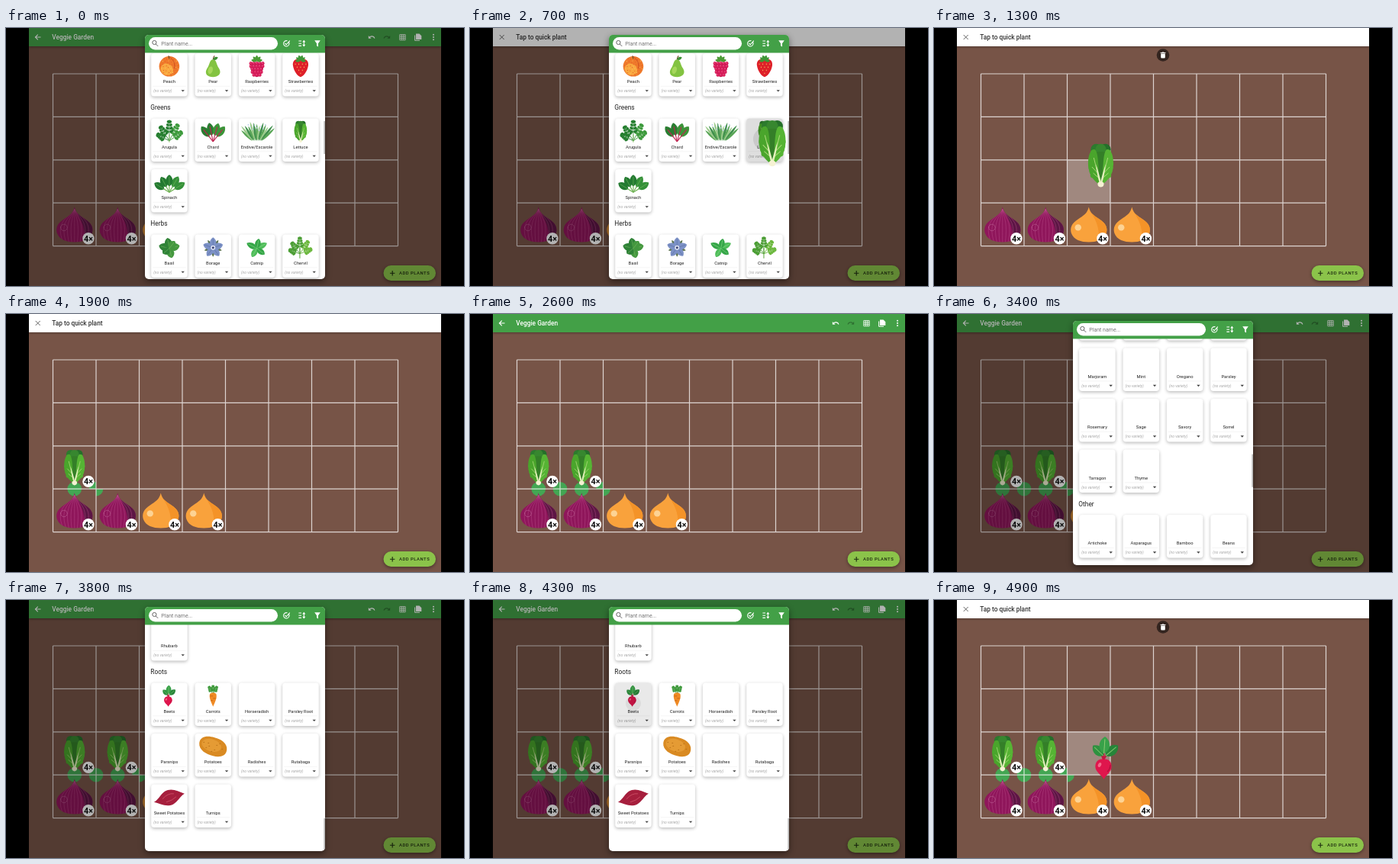
These frames come from a looping animation (600 by 338 pixels, 5 s). An HTML page with a canvas:

```html
<!DOCTYPE html>
<html lang="en">
<head>
<meta charset="utf-8">
<title>Garden planner</title>
<style>
html, body { margin: 0; width: 100%; height: 100%; overflow: hidden; background: #000; }
canvas { display: block; width: 600px; height: 338px; }
</style>
</head>
<body>
<canvas id="stage"></canvas>
<script>
const canvas = document.getElementById('stage');
const c = canvas.getContext('2d');
const dpr = window.devicePixelRatio || 1;
canvas.width = 600 * dpr;
canvas.height = 338 * dpr;

const LOOP = 5000, STEP = 100;
const GX = 61.5, GY = 60, CW = 56.5, CH = 56.4;
const FONT = 'Roboto, Arial, sans-serif';

// ---------- helpers ----------
const clamp = v => Math.max(0, Math.min(1, v));
const ramp = (t, a, b) => clamp((t - a) / (b - a));
const ease = v => v * v * (3 - 2 * v);
const lerp = (a, b, v) => a + (b - a) * v;

function fill(d, color) {
  c.fillStyle = color;
  c.fill(new Path2D(d));
}
function line(d, color, w = 1) {
  c.strokeStyle = color;
  c.lineWidth = w;
  c.stroke(new Path2D(d));
}
function oval(x, y, rx, ry, color, rot = 0) {
  c.beginPath();
  c.ellipse(x, y, rx, ry, rot, 0, 7);
  c.fillStyle = color;
  c.fill();
}
const dot = (x, y, r, color) => oval(x, y, r, r, color);
function box(x, y, w, h, r, color) {
  c.beginPath();
  c.roundRect(x, y, w, h, r);
  c.fillStyle = color;
  c.fill();
}
function at(x, y, k, draw, deg = 0) {
  c.save();
  c.translate(x, y);
  c.rotate(deg * Math.PI / 180);
  c.scale(k, k);
  draw();
  c.restore();
}
function text(str, x, y, font, color, align = 'left', gap = 0) {
  c.font = font + ' ' + FONT;
  c.fillStyle = color;
  c.textAlign = align;
  c.textBaseline = 'alphabetic';
  c.letterSpacing = gap + 'px';
  c.fillText(str, x, y);
}
function shadow(color, blur, dy) {
  c.shadowColor = color;
  c.shadowBlur = blur * dpr;
  c.shadowOffsetY = dy * dpr;
}
const noShadow = () => shadow('transparent', 0, 0);

// A pointed leaf growing upwards from (x, y), turned by deg.
function leaf(x, y, deg, len, w, color, rib) {
  at(x, y, 1, () => {
    fill(`M0 0C${w} ${-len * .2} ${w} ${-len * .75} 0 ${-len}C${-w} ${-len * .75} ${-w} ${-len * .2} 0 0`, color);
    if (rib) line(`M0 0V${-len * .85}`, rib, .5);
  }, deg);
}
function frond(x, y, deg, len, r, color) {
  at(x, y, 1, () => {
    line(`M0 0V${-len}`, color, .8);
    for (let i = 3; i <= 6; i++) {
      const v = -len * i / 6, w = r * (1.25 - i / 8);
      oval(-w, v, w, r * .55, color, .5);
      oval(w, v, w, r * .55, color, -.5);
    }
    dot(0, -len, r * .7, color);
  }, deg);
}

// ---------- plants, about 28 units tall ----------
const plants = {
  Peach() {
    dot(0, 0, 13.3, '#ef7a2b');
    oval(-3, 4, 8.5, 7.5, '#f9a83f', .4);
    for (let i = 0; i < 46; i++) {
      const a = i * 2.4, r = 1.9 * Math.sqrt(i);
      dot(Math.cos(a) * r, Math.sin(a) * r, .55, i % 3 ? '#e2562b' : '#fbc768');
    }
    line('M0 -13C5 -9 8 -4 7 3', '#c9471f', .9);
    line('M0 -10L-1 -14', '#6b4a25', 1.2);
  },
  Pear() {
    fill('M0 -9C5 -9 4 -2 8 3C12 10 6 14 0 14C-7 14 -12 10 -8 3C-4 -2 -5 -9 0 -9', '#83c341');
    oval(-3.5, 5, 3, 5, '#a6d75b', .3);
    line('M0 -9C0 -11 1 -13 2 -14', '#6a4a24', 1.2);
    leaf(0, -9, 65, 7, 2.6, '#3d8f35');
  },
  Raspberries() {
    fill('M-9 -5C-10 4 -4 14 0 14C4 14 10 4 9 -5Z', '#b5124c');
    for (let j = 0; j < 5; j++)
      for (let i = 0, n = 5 - (j >> 1); i < n; i++) {
        const x = (i - (n - 1) / 2) * 3.9, y = -4 + j * 3.8;
        dot(x, y, 2.2, '#d81e5b');
        dot(x - .6, y - .6, .7, '#f06a95');
      }
    for (let a = -80; a <= 80; a += 40) leaf(0, -7, a, 7.5, 2.4, '#4b9b35');
  },
  Strawberries() {
    fill('M0 -8C6 -12 11 -7 10 -1C9 6 4 13 0 14C-4 13 -9 6 -10 -1C-11 -7 -6 -12 0 -8', '#de2029');
    for (let j = 0; j < 4; j++)
      for (let i = 0; i < 4 - j; i++) oval((i - (3 - j) / 2) * 4.6, -3 + j * 4, .5, .9, '#f9cf62');
    for (let a = -100; a <= 100; a += 40) leaf(0, -8, a, 7, 2.3, '#3f9636');
  },
  Arugula() {
    [-62, 55, -32, 28, 0].forEach((a, i) =>
      frond(0, 12, a, 17 + i * 2, 3.2, i % 2 ? '#3d9a3c' : '#267f30'));
    line('M0 14V4', '#8cc46a', 1);
  },
  Chard() {
    [-38, 38, -12, 16].forEach((a, i) => {
      at(0, 13, 1, () => {
        leaf(0, -8, 0, 17, 6, i % 2 ? '#3c9439' : '#2a7d31');
        line('M0 0V-20', '#bf2450', 1.1);
      }, a);
    });
  },
  'Endive/Escarole'() {
    for (let i = 0; i < 13; i++) {
      const a = (i - 6) * 11;
      leaf(i - 6, 12, a * .7, 20 + i * 5 % 7, 1.9, ['#5aa657', '#9ccb8b', '#3f8f4c'][i % 3]);
    }
    for (let i = 0; i < 9; i++) dot((i - 4) * 2.8, -9 + i * 3 % 8, .9, '#b9cdea');
  },
  Lettuce() {
    [[-3, '#2c7b2e'], [3, '#256f2a'], [0, '#37872f']].forEach(([x, k]) => oval(x, -10.5, 3.6, 3.6, k));
    fill('M0 13C-10 6 -9 -10 0 -9C9 -10 10 6 0 13', '#347f28');
    for (const m of [-1, 1]) {
      c.save();
      c.scale(m, 1);
      const green = m < 0 ? '#4aa52c' : '#56b434';
      fill('M.5 13C3 11 7 8 8 2C9 -5 7 -11 4 -10.5C1 -8 2 2 .5 13', green);
      for (let i = 0; i < 7; i++) dot(6.6 - Math.abs(i - 3.2) * .55, -8.5 + i * 2.5, 1.8, green);
      line('M.5 12C2 6 3 1 4.6 -5M2 5L5.8 1M1.6 8L5 5', '#a9d877', .5);
      fill('M0 13C2 9 2.6 4 3.2 -1C1.8 3 .8 7 0 10Z', '#e4f0be');
      c.restore();
    }
    fill('M-2 11.5Q0 9.5 2 11.5Q2.4 14 0 14.3Q-2.4 14 -2 11.5', '#f5f2d3');
  },
  Spinach() {
    [-58, 58, -28, 30, 0].forEach((a, i) => at(0, 13, 1, () => {
      line('M0 0V-12', '#6bb04f', 1.1);
      leaf(0, -8, 0, 15 + i % 2, 6, i % 2 ? '#359139' : '#237a31', '#79bd62');
    }, a));
  },
  Basil() {
    [[-75, 14], [75, 14], [-10, 14], [165, 13], [-130, 11], [38, 12]].forEach(([a, l], i) =>
      leaf(0, 1, a, l, 6.5, i % 2 ? '#44983f' : '#2f8237', '#7dbb68'));
  },
  Borage() {
    for (let a = 36; a < 396; a += 72) leaf(0, 0, a, 12, 2.4, '#5f7653');
    for (let a = 0; a < 360; a += 72) leaf(0, 0, a, 13.5, 5.6, '#7c91c6', '#52689f');
    dot(0, 0, 3, '#dfe5f4');
    dot(0, 0, 1.5, '#3a4272');
  },
  Catnip() {
    [-62, 62, 12, -150, 128].forEach((a, i) =>
      leaf(0, 1, a, i < 2 ? 15 : 13, 5, i % 2 ? '#4fbd5a' : '#35a648', '#8fdd8e'));
  },
  Chervil() {
    [-70, 68, -36, 34, 0].forEach((a, i) => frond(-1, 8, a, 14 + i * 1.6, 2.9, i % 2 ? '#6cb83e' : '#4c9e35'));
    line('M-1 14V0', '#5ba53a', 1);
  },
  Beets() {
    line('M-1.5 2L-1 -8M-1.5 2Q-2 -2 -5 -5M-1.5 2Q0 -3 4 -5', '#c2183f', 1);
    leaf(-1.6, -1.5, -46, 9.5, 4, '#2f9140', '#7fc06c');
    leaf(0, -1.5, 50, 10.5, 4.2, '#268539', '#7fc06c');
    leaf(-1.2, -3, 4, 11, 4.5, '#38a149', '#8acb73');
    fill('M-1.5 1C2 0 4 3 3.8 6C3.5 9.5 0 11 -1.2 14C-2.6 11 -6.5 9.5 -6.8 6C-7 3 -5 0 -1.5 1', '#df164d');
    oval(-4, 4.5, 1, 1.5, '#f36a8b', .5);
    line('M1 9Q3 7 3 4.5', '#b00f3c', .6);
  },
  Carrots() {
    [-28, 26, 0].forEach(a => frond(0, -2, a, 11, 2, '#3f9a3c'));
    fill('M-4 -3Q0 -6 4 -3C6 2 2 9 0 14C-2 9 -6 2 -4 -3', '#f08a24');
    line('M-4 0H0M4 3H0M-3 6H0', '#b95c12', .7);
  },
  Potatoes() {
    fill('M-18 -5C-17 -14 -7 -15 2 -12C11 -10 19 -4 18 4C17 13 8 14 0 12C-9 10 -19 4 -18 -5', '#d98a22');
    oval(-2, -2, 13, 8, '#e59b34', .3);
    for (let i = 0; i < 9; i++) oval(i * 7 % 25 - 12, i * 5 % 13 - 6, 1, .5, '#b56d15');
  },
  'Sweet Potatoes'() {
    fill('M-20 6C-14 3 -12 -4 -6 -8C2 -13 11 -9 20 -5C14 -2 12 5 5 9C-4 13 -12 8 -20 6', '#a61f3d');
    line('M-9 2Q-2 -6 6 -5M-4 6Q4 4 9 -1', '#c94a62', 1);
  }
};

const BULB = new Path2D('M0-23C2-14 7-12 14-7C22-2 25 4 23 11C20 20 10 23 0 23C-10 23-20 20-23 11C-25 4-22-2-14-7C-7-12-2-14 0-23Z');
function onion(base, shade, ribs) {
  c.save();
  c.clip(BULB);
  c.fillStyle = base;
  c.fillRect(-25, -24, 50, 48);
  fill('M0 -24C4 -10 17 0 12 24H26V-24Z', shade);
  if (ribs) {
    for (let i = -4; i <= 4; i++) line(`M0 -20C${i} -10 ${i * 7} -6 ${i * 3.6} 24`, ribs, .45);
    c.setLineDash([1, 1]);
    line('M-18 4a4.2 4.2 0 1 0 8.4 0a4.2 4.2 0 1 0 -8.4 0', '#d287b0', .8);
    c.setLineDash([]);
  } else {
    dot(-14, 4, 4.2, '#fdd394');
  }
  c.restore();
}
const redOnion = () => onion('#8f165b', '#5c1644', '#b9508c');
const yellowOnion = () => onion('#f9a23c', '#f49328');

// ---------- garden ----------
function badge(col, row) {
  const x = GX + col * CW + 46.4, y = GY + row * CH + 46.6;
  dot(x, y, 7.7, '#fff');
  text('4×', x, y + 3.8, 'bold 10.8px', '#111', 'center');
}
function planted(col, row, k, draw) {
  at(GX + (col + .5) * CW, GY + (row + .5) * CH, k, draw);
  badge(col, row);
}
function quarter(x, y, q) {
  c.beginPath();
  c.moveTo(x, y);
  c.arc(x, y, 9.3, q * Math.PI / 2, (q + 1) * Math.PI / 2);
  c.fillStyle = '#43a653';
  c.fill();
}
function companions(col) {
  const x = GX + col * CW, y = GY + 3 * CH;
  dot(x + CW / 2, y, 9.3, '#43a653');
  for (const q of [0, 2]) quarter(x + CW, y, q);
  if (col) for (const q of [1, 3]) quarter(x, y, q);
}
function garden(lettuces, hover) {
  c.fillStyle = '#775447';
  c.fillRect(30, 0, 540, 338);
  if (hover) {
    c.fillStyle = 'rgba(255,255,255,.3)';
    c.fillRect(GX + hover[0] * CW, GY + hover[1] * CH, CW, CH);
  }
  for (let i = 0; i < lettuces; i++) companions(i);
  let d = '';
  for (let i = 0; i <= 8; i++) d += `M${GX + i * CW} ${GY}v${4 * CH}`;
  for (let j = 0; j <= 4; j++) d += `M${GX} ${GY + j * CH}h${8 * CW}`;
  line(d, 'rgba(255,255,255,.75)', 1.2);
  for (let i = 0; i < 4; i++) planted(i, 3, 1, i < 2 ? redOnion : yellowOnion);
  for (let i = 0; i < lettuces; i++) planted(i, 2, 1.64, plants.Lettuce);
}

const UNDO = 'M12.5 8c-2.65 0-5.05.99-6.9 2.6L2 7v9h9l-3.62-3.62c1.39-1.16 3.16-1.88 5.12-1.88 3.54 0 6.55 2.31 7.6 5.5l2.37-.78C21.08 11.03 17.15 8 12.5 8z';
function appBar(quick) {
  shadow('rgba(0,0,0,.35)', 3, 1);
  c.fillStyle = quick ? '#fff' : '#43a047';
  c.fillRect(30, 0, 540, 24);
  noShadow();
  if (quick) {
    line('M38.7 9L44.7 15M44.7 9L38.7 15', '#666', 1);
    text('Tap to quick plant', 60.3, 15, '500 8.35px', '#333');
    return;
  }
  line('M45.5 12H38.5M41.8 8.6L38.4 12L41.8 15.4', '#fff', 1.1);
  text('Veggie Garden', 60.3, 15, '500 8.35px', '#fff');
  at(474, 7, .42, () => fill(UNDO, '#fff'));
  c.save();
  c.translate(504, 7);
  c.scale(-.42, .42);
  fill(UNDO, 'rgba(0,0,0,.3)');
  c.restore();
  line('M515.8 8.6h7.4v7.2h-7.4zM518.3 8.6v7.2M520.8 8.6v7.2M515.8 11h7.4M515.8 13.4h7.4', '#fff', .8);
  line('M535.6 9.5V16.3H542', '#fff', 1);
  fill('M537 7.5H541.5L544.3 10.3V15H537Z', '#fff');
  for (const y of [8.8, 12, 15.2]) dot(560, y, 1, '#fff');
}
function addButton() {
  shadow('rgba(0,0,0,.4)', 4, 1.5);
  box(494.5, 311, 68.5, 20, 10, '#8bc34a');
  noShadow();
  line('M503 321.2H509.4M506.2 318V324.4', '#1d2a10', 1.1);
  text('ADD PLANTS', 515, 323.4, '500 5.9px', '#1d2a10', 'left', .5);
}
function trash() {
  dot(300, 35.5, 8.3, '#33241f');
  fill('M297.2 33.6H302.8V38.6Q302.8 39.6 301.8 39.6H298.2Q297.2 39.6 297.2 38.6ZM296.6 32H298.5L299 31.4H301L301.5 32H303.4V33H296.6Z', '#fff');
}

// ---------- plant picker ----------
const sections = [
  ['Fruits', 'Peach,Pear,Raspberries,Strawberries'],
  ['Greens', 'Arugula,Chard,Endive/Escarole,Lettuce,Spinach'],
  ['Herbs', 'Basil,Borage,Catnip,Chervil,Chives,Cilantro,Dill,Fennel,Hyssop,Lavender,Lemon Balm,Lovage,Marjoram,Mint,Oregano,Parsley,Rosemary,Sage,Savory,Sorrel,Tarragon,Thyme'],
  ['Other', 'Artichoke,Asparagus,Bamboo,Beans,Broccoli,Cabbage,Cauliflower,Celery,Chickpeas,Corn,Cowpeas,Cucumbers,Eggplant,Fava Beans,Gourds,Kale,Kohlrabi,Leeks,Lentils,Melons,Mushrooms,Okra,Onions,Peas,Peppers,Pumpkins,Quinoa,Radicchio,Rhubarb'],
  ['Roots', 'Beets,Carrots,Horseradish,Parsley Root,Parsnips,Potatoes,Radishes,Rutabaga,Sweet Potatoes,Turnips']
].map(([title, names]) => [title, names.split(',')]);

function card(name, x, y, press) {
  shadow('rgba(0,0,0,.28)', 4, 1.5);
  box(x, y, 47.5, 56.5, 4, '#fff');
  noShadow();
  if (plants[name]) at(x + 23.7, y + 17.3, 1, plants[name]);
  text(name, x + 23.7, y + 39.3, '5.8px', '#222', 'center');
  line(`M${x + 2} ${y + 43.3}h43.5`, '#eee', .6);
  text('(no variety)', x + 3, y + 51.3, 'italic 5px', '#a5a5a5');
  fill(`M${x + 39.3} ${y + 48.3}h4.4l-2.2 2.3z`, '#444');
  if (press) {
    box(x, y, 47.5, 56.5, 4, `rgba(0,0,0,${.13 * press})`);
    dot(x + 23.7, y + 27, 15 * press, `rgba(0,0,0,${.09 * press})`);
  }
}
function picker(open, scroll, pressed, press) {
  c.save();
  c.globalAlpha = open;
  const k = lerp(.9, 1, open);
  c.translate(300, 169);
  c.scale(k, k);
  c.translate(-300, -169);
  shadow('rgba(0,0,0,.45)', 9, 3);
  box(182, 9, 236, 320, 5, '#fff');
  noShadow();
  c.beginPath();
  c.roundRect(182, 9, 236, 320, 5);
  c.clip();

  let y = 18.5 - 1131 * scroll;
  for (const [title, names] of sections) {
    text(title, 189.3, y + 3.2, '8.4px', '#222');
    names.forEach((name, i) => {
      const top = y + 14.5 + (i >> 2) * 66.5;
      if (top > -30 && top < 332) card(name, 190.2 + i % 4 * 57.35, top, name === pressed && press);
    });
    y += Math.ceil(names.length / 4) * 66.5 + 19;
  }
  box(416.3, lerp(122, 286, scroll), 1.7, 43, 0, '#bdbdbd');

  c.fillStyle = '#43a047';
  c.fillRect(182, 9, 236, 23.5);
  box(187, 12, 169, 16.5, 8.25, '#fff');
  line('M191.8 19a2.6 2.6 0 1 0 5.2 0a2.6 2.6 0 1 0 -5.2 0M196.3 21L199.2 23.9', '#666', 1);
  text('Plant name...', 203.3, 22.6, '7px', '#757575');
  line('M370.6 18.6A3.7 3.7 0 1 1 368.5 16.8M365.4 20L367.2 21.8L371.8 16.6', '#fff', 1.1);
  line('M383.4 17H387M383.4 20.2H387M383.4 23.4H387M390.3 17V23.5', '#fff', 1.1);
  fill('M388.2 18.6L390.3 15.8L392.4 18.6ZM388.2 21.8L390.3 24.6L392.4 21.8Z', '#fff');
  fill('M404.2 16.3H411.8L409 20.3V24.6L407 23.2V20.3Z', '#fff');
  c.restore();
}

// ---------- timeline ----------
const drags = [
  { name: 'Lettuce', from: 700, to: 1800, path: [[700, 396, 151], [1300, 218.5, 180], [1700, 92, 201]] },
  { name: 'Beets', from: 4400, to: 5000, path: [[4300, 214, 126], [4900, 225, 207]] }
];
function along(path, t) {
  let i = 1;
  while (i < path.length - 1 && t > path[i][0]) i++;
  const a = path[i - 1], b = path[i], v = ramp(t, a[0], b[0]);
  return [lerp(a[1], b[1], v), lerp(a[2], b[2], v)];
}
function openness(t) {
  if (t < 2000) return 1 - ramp(t, 800, 1100);
  return ease(ramp(t, 2700, 3000)) * (1 - ramp(t, 4450, 4750));
}

function render(t) {
  c.setTransform(dpr, 0, 0, dpr, 0, 0);
  c.fillStyle = '#000';
  c.fillRect(0, 0, 600, 338);

  const open = openness(t);
  const drag = drags.find(d => t >= d.from && t < d.to);
  const pos = drag && along(drag.path, t);
  const hover = pos && open < .5 && [Math.floor((pos[0] - GX) / CW), Math.floor((pos[1] - GY) / CH)];
  const quick = t >= 700 && t < 2500 || t >= 4400;

  c.save();
  c.beginPath();
  c.rect(30, 0, 540, 338);
  c.clip();
  garden((t >= 1800) + (t >= 2200), hover);
  appBar(quick);
  addButton();
  if (drag) trash();
  if (open) {
    c.fillStyle = `rgba(0,0,0,${.3 * open})`;
    c.fillRect(30, 0, 540, 338);
    const first = t < 2000;
    picker(open, ease(ramp(t, 3150, 3750)), first ? 'Lettuce' : 'Beets',
      first ? ramp(t, 400, 700) : ramp(t, 4100, 4400));
  }
  if (drag) at(pos[0], pos[1], 2 + .12 * open, plants[drag.name]);
  c.restore();
}

let shown = -1;
function tick(now) {
  const t = Math.floor(now % LOOP / STEP) * STEP;
  if (t !== shown) render(shown = t);
  requestAnimationFrame(tick);
}
render(0);
requestAnimationFrame(tick);
</script>
</body>
</html>
```
